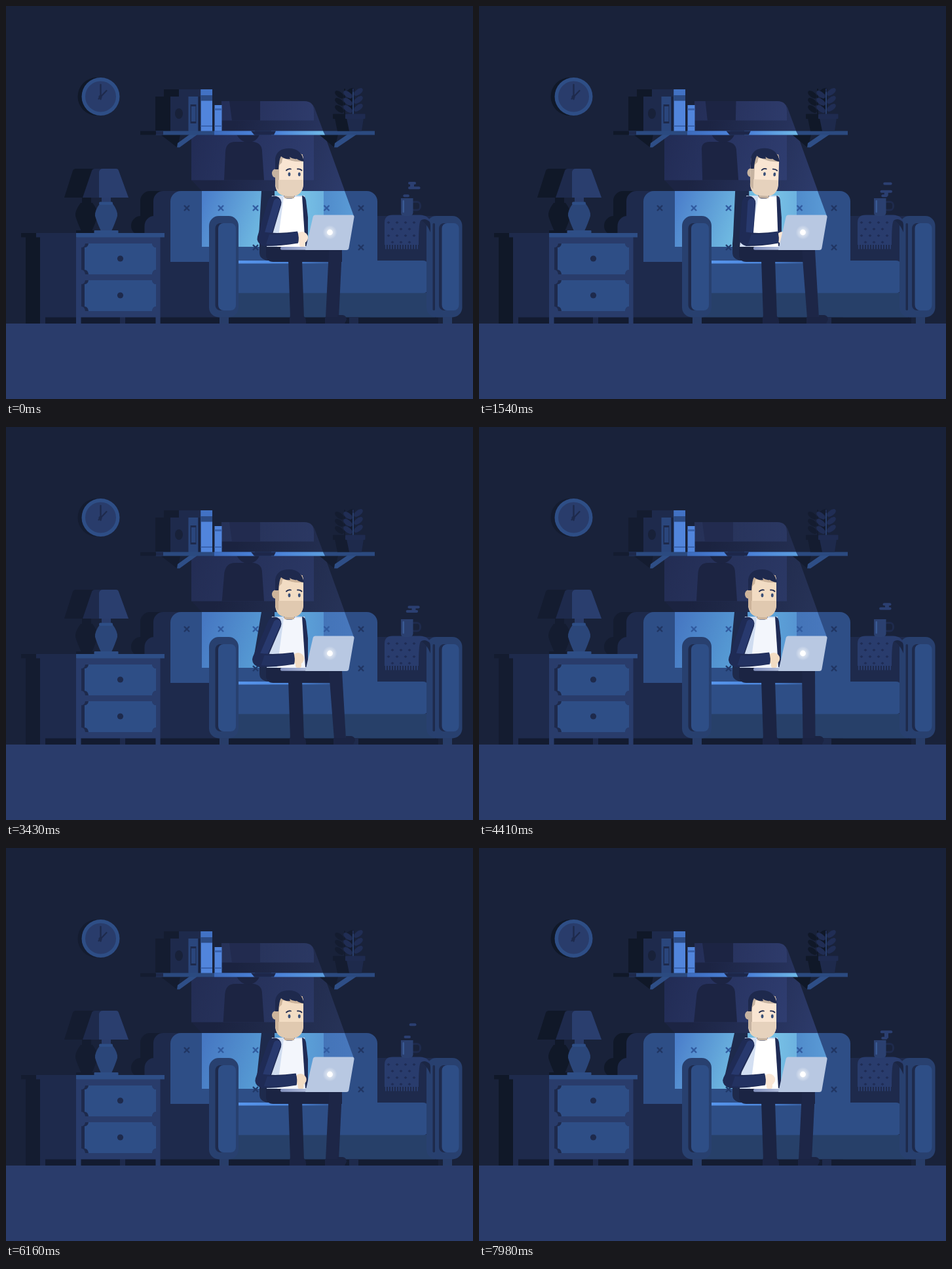
Animation, 713 px wide and 599 px high, one loop 8 s. Source, as an HTML page with a canvas:

```html
<!DOCTYPE html>
<html lang="en">
<head>
<meta charset="utf-8">
<title>Late night on the sofa</title>
<style>
html, body { margin: 0; width: 100%; height: 100%; overflow: hidden; background: #19223a; }
canvas { display: block; }
</style>
</head>
<body>
<canvas id="stage" width="713" height="599"></canvas>
<script>
const c = document.getElementById('stage').getContext('2d');
const LOOP = 8000, STEP = 70;
const WALL = '#19223a', DARK = '#1e2a4c', MID = '#293c6b', LIGHT = '#2e4e86', BLUE = '#5185dc';
const PANTS = '#1b2443', JACKET = '#1f2b55', SLEEVE = '#28396e', HAIR = '#1e294d';
let glow = 1, shade = '#101828';

const clamp = v => Math.max(0, Math.min(1, v));
const smooth = v => { v = clamp(v); return v * v * (3 - 2 * v); };

function keyed(keys, t) {
  if (t <= keys[0][0]) return keys[0][1];
  for (let i = 1; i < keys.length; i++) {
    const [t0, a] = keys[i - 1], [t1, b] = keys[i];
    if (t <= t1) return a + (b - a) * smooth((t - t0) / (t1 - t0));
  }
  return keys[keys.length - 1][1];
}

// Picks between the dim and the bright colour of the screen light.
const lit = (dim, bright) => glow ? bright : dim;

function box(x0, y0, x1, y1, fill, r = 0) {
  c.fillStyle = fill;
  c.beginPath();
  c.roundRect(x0, y0, x1 - x0, y1 - y0, r);
  c.fill();
}

function poly(fill, ...p) {
  c.fillStyle = fill;
  c.beginPath();
  for (let i = 0; i < p.length; i += 2) c.lineTo(p[i], p[i + 1]);
  c.closePath();
  c.fill();
}

function shape(fill, d) {
  c.fillStyle = fill;
  c.fill(new Path2D(d));
}

function oval(x, y, rx, ry, fill, turn = 0) {
  c.fillStyle = fill;
  c.beginPath();
  c.ellipse(x, y, rx, ry, turn, 0, 7);
  c.fill();
}

function line(color, w, ...p) {
  c.strokeStyle = color;
  c.lineWidth = w;
  c.beginPath();
  for (let i = 0; i < p.length; i += 2) c.lineTo(p[i], p[i + 1]);
  c.stroke();
}

function ramp(x0, y0, x1, y1, ...colors) {
  const g = c.createLinearGradient(x0, y0, x1, y1);
  colors.forEach((k, i) => g.addColorStop(i / (colors.length - 1), k));
  return g;
}

function clock() {
  oval(138.5, 138, 29, 29, shade);
  oval(144.5, 138, 29, 29, LIGHT);
  oval(144.5, 138, 23.5, 23.5, MID);
  c.lineCap = 'round';
  line(DARK, 2.4, 144.5, 120, 144.5, 142);
  line(DARK, 2.2, 153.5, 129, 141.5, 141.5);
  oval(144, 138.5, 2.6, 2.6, DARK);
}

function wallLight(lean, arm) {
  const dark = lit('#1c2442', '#1c2443');
  shape(ramp(330, 240, 510, 300, lit('#1b2340', '#1c2443'), lit('#273358', '#2d3b6b')),
    'M329 145H455Q466 145 471 155L484 190L531 320H299V282L283 265V197H329Z');
  shape(ramp(329, 145, 470, 175, lit('#263157', '#242e57'), lit('#2b3863', '#2e3b6b')),
    'M329 145H455Q470 145 470 160V174.5H329Z');
  box(283, 196, 470, 265.5, ramp(283, 200, 470, 265, lit('#232d54', '#222c55'), lit('#2b3865', '#2f3d70')));
  // Cast shadow of the sitter
  const hx = 11 * lean, bx = 6 * lean, ex = bx + .55 * arm;
  poly(lit('#222b4f', dark), 341 + hx * 1.2, 145, 388 + hx * 1.15, 145, 388 + hx, 174.5, 345 + hx, 174.5);
  shape(dark, `M${333 + ex} 265.5L${335 + (bx + ex) / 2} 222Q${336 + bx} 207 ${350 + bx} 207H${378 + bx}
    Q${391 + bx} 209 ${391 + bx} 222L${394 + bx} 265.5Z`);
  shape(dark, `M${352 + hx * .8} 196H${387 + hx * .8}Q${382 + hx * .7} 208 ${369 + hx * .7} 208
    Q${358 + hx * .7} 207 ${352 + hx * .8} 196Z`);
}

function books() {
  box(228, 138, 251, 191, shade);
  box(241, 127, 264, 139, shade);
  box(264, 127, 297, 191, DARK);
  box(251, 138, 279, 191, DARK);
  oval(264, 164, 6, 8, '#182139');
  box(278.5, 138, 293.5, 191, '#2a467c');
  box(281.5, 150, 290.5, 179, DARK);
  box(283, 153, 289.5, 176, '#2a467c');
  box(293.5, 138, 297.5, 191, '#19233f');
  box(297.5, 127, 315, 191, BLUE);
  box(297.5, 127, 315, 136, '#4272c4');
  box(297.5, 136, 315, 144.5, '#2c4b84');
  box(297.5, 182, 315, 184, '#3a64b0');
  box(318.5, 151, 329.5, 191, BLUE);
  box(318.5, 156, 329.5, 159, '#3a64b0');
  box(318.5, 182, 329.5, 184, '#3a64b0');
}

function shelf(lean) {
  const hx = 10 * lean;
  poly(shade, 236, 196, 266, 196, 262, 216);
  poly(LIGHT, 262, 209, 280, 196, 292, 196, 265, 215.5, 261, 215.5);
  poly(shade, 478, 196, 507, 196, 502, 216);
  poly(LIGHT, 502, 209, 521, 196, 535, 196, 506, 215.5, 501, 215.5);
  box(205, 190.5, 228, 196.5, shade);
  box(228, 190.5, 563, 196.5, '#2b4a80');
  box(205, 190.5, 240, 196.5, DARK);
  box(205, 190.5, 229, 196.5, shade);
  box(318, 190.5, 380 + hx, 196.5, ramp(318, 0, 380, 0, '#3c6abc', '#4b82d8'));
  poly(ramp(411, 0, 487, 0, '#4a80d8', lit('#5c9ede', '#70bae8')), 405, 190.5, 484, 190.5, 487, 196.5, 405, 196.5);
  poly('#1d274a', 374 + hx, 190.5, 412 + hx * .8, 190.5, 409 + hx * .8, 196.5, 379 + hx, 196.5);
}

function leaves(x, y, color) {
  for (let i = 0; i < 3; i++) {
    oval(x + 8, y + 5 + i * 12, 8, 4.2, color, -.65);
    oval(x - 8, y + 9 + i * 11, 8, 4.2, color, .65);
  }
  c.lineCap = 'butt';
  line(color, 2, x, y, x, 166);
}

function plant() {
  leaves(517, 126, shade);
  leaves(530, 126, '#202d54');
  line('#2b4474', 1.5, 530, 131, 530, 165);
  poly(shade, 502, 171, 524, 171, 524, 190.5, 506, 190.5);
  box(499, 164.5, 522, 172, shade, 1);
  poly(DARK, 520, 171, 546, 171, 543, 190.5, 524, 190.5);
  box(518, 164.5, 548.5, 172, '#1f2b50', 1);
}

function lamp() {
  const vase = x => `M${x - 7} 292H${x + 7}V300H${x + 9}Q${x + 18} 312 ${x + 17} 320Q${x + 14} 330 ${x + 8} 343
    H${x - 8}Q${x - 14} 330 ${x - 17} 320Q${x - 18} 312 ${x - 9} 300H${x - 7}Z`;
  shape(shade, vase(123));
  shape(shade, 'M89 292L102 251Q103 248 107 248H136L119 292Z');
  box(107, 342, 136, 346, shade);
  shape('#2b4679', vase(153));
  box(142, 298.5, 163, 303, LIGHT, 2);
  box(146, 291, 160, 298.5, MID);
  box(134.5, 342, 171.5, 346.5, LIGHT, 1);
  shape(DARK, 'M117 292L131 251Q132 248 136 248H168Q171 248 172 251L187 292Z');
  shape('#2a3e6e', 'M142 292V253Q143 248 148 248H168Q171 248 172 251L187 292Z');
}

function drawer(y) {
  const d = x => `M${x + 6} ${y}H223Q224 ${y + 6} 229 ${y + 6}V${y + 40}Q224 ${y + 40} 223 ${y + 47}H${x + 6}
    Q${x + 5} ${y + 40} ${x} ${y + 40}V${y + 6}Q${x + 5} ${y + 6} ${x + 6} ${y}Z`;
  shape(DARK, d(115));
  shape(LIGHT, d(120));
  oval(174.5, y + 23, 4.6, 4.6, DARK);
}

function dresser() {
  box(30, 352, 53, 484, shade);
  box(52, 474, 235, 484, '#131b30');
  box(52, 352, 108, 474.5, DARK);
  box(52, 474, 60, 484, DARK);
  box(174, 474, 182, 484, DARK);
  box(107, 352, 235.5, 474.5, MID);
  box(107, 474, 114.5, 484, MID);
  box(228.5, 474, 235.5, 484, MID);
  box(23, 346, 47, 352.5, shade);
  box(46, 346, 108, 352.5, DARK);
  box(107, 346, 242, 352.5, LIGHT);
  drawer(362);
  drawer(418);
}

function armrest(x0, x1, p0, p1) {
  box(x0, 320, x1, 474.5, '#28406f', 15);
  box(p0 - 4.5, 331, p1 - 4, 464, DARK, 8);
  box(p0, 331, p1, 464, LIGHT, 8);
}

function cross(x, y, color) {
  c.lineCap = 'butt';
  line(color, 2.4, x - 4, y - 4, x + 4, y + 4);
  line(color, 2.4, x + 4, y - 4, x - 4, y + 4);
}

function sofa() {
  box(205, 282, 260, 360, shade, 15);
  box(191, 320, 240, 350, shade, 15);
  box(236, 474, 660, 484, '#141c31');
  box(225, 282, 300, 400, DARK, 15);
  box(211.5, 320, 340, 474.5, DARK, [15, 0, 0, 0]);
  box(556, 320, 680, 474.5, DARK);
  box(251, 282, 567, 390, LIGHT, [16, 16, 0, 0]);
  shape(ramp(299, 300, 400, 340, lit('#4677c2', '#4b7fcb'), lit('#589fd6', '#72bee3')),
    'M299 282H420V367H299Z');
  box(420, 282, 485.5, 367, ramp(440, 0, 485, 0, lit('#5ea6da', '#7bc6e8'), lit('#5795d2', '#6db2df')));
  poly(ramp(485, 0, 530, 0, lit('#4474b8', '#508bcb'), lit('#4878bd', '#5a9bd6')),
    485, 282, 517, 282, 531, 320, 485, 330);
  for (const x of [276, 542]) cross(x, 308, '#213663');
  for (const x of [328, 381, 489.5]) cross(x, 308, '#315ba0');
  cross(381, 368, '#213a6a');
  cross(542, 368, '#213663');
  box(340, 437, 655, 474.5, '#274069');
  box(340, 388, 645, 437.5, LIGHT, [0, 8, 8, 0]);
  box(340, 388, 520, 392.5, ramp(355, 0, 515, 0, '#5795ec', '#4c86db', '#2e4e86'));
  poly(DARK, 645, 388, 655, 388, 655, 437, 645, 437);
  armrest(310, 355, 324, 351);
  armrest(642, 696.5, 665.5, 691.5);
  box(651.5, 331, 655, 464, DARK, 2);
  box(326, 474, 340, 484, '#283d69');
  box(667, 474, 681, 484, '#283d69');
  box(524, 474, 538, 484, DARK);
}

function blanket() {
  shape('#1b2644', 'M612 319H634Q648 322 648 335V345Q640 326 630 326Z');
  shape('#293c6d', 'M578 364V330Q578 318.500 590 318.500H632Q646 319 648 330Q640 322 633 327Q630 331 630 364Z');
  for (let j = 0; j < 4; j++)
    for (let i = 0; i < 4; i++) {
      const x = 584 + i * 13 + (j % 2) * 6;
      if (x < 628) poly('#1f2c54', x, 328 + j * 10, x + 2.5, 330 + j * 10, x, 332 + j * 10, x - 2.5, 330 + j * 10);
    }
  for (let x = 579; x < 630; x += 4) box(x, 364, x + 2, 370.5, '#293c6d');
}

function cup() {
  c.strokeStyle = DARK;
  c.lineWidth = 3;
  c.beginPath();
  c.roundRect(618, 298.5, 14.5, 12.5, 5);
  c.stroke();
  shape('#2b4070', 'M603 293H621.500V315Q621 320 616 320H608Q603 320 603 315Z');
  box(605.5, 296, 608, 315, '#3a5a94', 1);
}

function steam(t) {
  const puffs = [[270, 620], [277.3, 623], [289.3, 622], [295.8, 620], [314.5, 622], [324, 619]]
    .map(([y0, x], i) => {
      const y = y0 - .0043 * t;
      let w = 18.5 * smooth((y - 261.5) / 14);
      if (y > 283) w -= Math.min(9, (y - 283) * 1.6);
      const hook = i % 2 ? 0 : 10 * smooth((y - 283) / 6);
      return { y, w, x: x - hook + (i === 0 ? -.004 * t : i < 4 ? (280 - y) * .1 : 0) };
    });
  c.save();
  c.beginPath();
  c.rect(595, 240, 50, 53);
  c.clip();
  puffs.forEach(({ x, y, w }, i) => {
    if (w <= 1.2 || y > 297) return;
    const h = Math.min(4, w + .5);
    box(x - w / 2, y - h / 2, x + w / 2, y + h / 2, '#2b3f71', h / 2);
    const next = puffs[i + 1];
    if (i % 2 === 0 && next && w > 9 && next.y < 292) box(x - 3, y, x + 3, next.y, '#2b3f71');
  });
  c.restore();
}

function legs(swing, tap) {
  shape(PANTS, 'M397 364H500Q513 370 513 378V390H408Q397 390 397 378Z');
  poly(PANTS, 431, 386, 452, 386, 455, 476, 434, 476);
  shape(PANTS, 'M434 472H452Q458 474 458 480V484H433V476Z');
  poly('#1d2647', 493, 372, 513, 372, 508 + swing * .85, 476, 488 + swing, 476);
  c.save();
  c.translate(488 + swing, 484);
  c.rotate(-tap);
  shape(PANTS, 'M-1 -10H18V-13H26Q32 -12 32 -6L29 0H-1Z');
  c.restore();
}

function head(lean) {
  const skin = lit('#f2dcc3', '#f9e5d2'), beard = lit('#e0c9b0', '#e6d2bd'), tan = lit('#cdb49b', '#c6b3a1');
  c.save();
  c.translate(432 + 6.5 * lean, 290);
  c.rotate(.1 * lean);
  c.translate(-432, -290 - lean);
  box(425, 280, 440, 293, tan);
  oval(411, 255, 5, 6.5, tan);
  box(411, 224, 454, 289.5, skin, [12, 8, 17, 19]);
  shape(tan, 'M411 240L418 226H453V237Q440 238 430 234Q424 231 422 233L417 265H411Z');
  shape(skin, 'M417 243Q426 232 436 236Q446 239 453.500 237V265H417Z');
  shape(beard, 'M411 265H453.500V273Q452 289.500 437 289.500H428Q413 289 411 273Z');
  shape(tan, 'M411 265H416V280Q411 276 411 270Z');
  shape(HAIR, 'M411 249V232Q414 217 432 217Q451 217 455 237Q448 236 444 233Q438 234 433 230L434 233Q425 234 420 229Q417 233 416 249Z');
  c.lineCap = 'round';
  c.strokeStyle = HAIR;
  c.lineWidth = 1.8;
  c.stroke(new Path2D('M428 250.500Q431 247.500 435 248.500M445 248.500Q449 248 451.500 250.500'));
  oval(432.5, 256.5, 1.9, 2.9, '#3a5078');
  oval(447.8, 256.5, 1.9, 2.9, '#3a5078');
  c.restore();
}

function man(lean, arm, swing, tap) {
  const b = 6.5 * lean, white = lit('#f3f6fc', '#ffffff'), pale = lit('#cfdcf0', '#d3dff2');
  const skin = lit('#f2dcc3', '#fae6d4');
  const sx = 410 + b * .8, ex = 394 + 1.25 * arm, hx = 452 + arm;
  const edge = Math.min(388, ex - 8);
  // Shadow on the cushion behind him
  shape(DARK, `M${390 + b * .5} 282H${410 + b}L412 388H400Q387 386 387 376V362L${edge} 350Z`);
  legs(swing, tap);
  shape(pale, `M${406 + b} 289H${456 + b}L460 367H398Z`);
  shape(white, `M${424 + b} 291H${454 + b * .9}L457 367H414Z`);
  shape(JACKET, `M${452 + b} 289Q${457 + b} 290 ${458 + b * .8} 296L${461 + b * .4} 322V366H457Z`);
  box(424 + b, 288, 441 + b, 293.5, HAIR, [0, 0, 6, 6]);
  head(lean);
  box(419, 367, 460, 371.8, ramp(419, 0, 460, 0, '#8290bd', '#b1bddc'), 2);
  // Arm
  oval(hx, 353, 9.2, 9, skin);
  box(hx - 4, 358, hx + 5, 367, skin, 3);
  c.lineJoin = c.lineCap = 'round';
  line(JACKET, 21, sx, 300, ex, 354.5);
  line(SLEEVE, 11, sx + 4, 299, ex + 5, 351);
  shape(JACKET, `M${ex - 4} 344Q${ex + 20} 348 ${hx - 7} 343.500Q${hx - 4} 353 ${hx - 6} 361.500
    Q${ex + 25} 366 ${ex} 366Q${ex - 10} 362 ${ex - 10} 354Z`);
  shape('#233261', `M${ex + 8} 348Q${ex + 24} 349 ${hx - 7} 344Q${hx - 5} 353 ${hx - 6} 361Q${ex + 20} 365 ${ex + 3} 363Z`);
}

function laptop() {
  shape('#b8c8e2', 'M472.500 318.500H528.500Q532 318.500 531.500 322L523.500 368.500Q523 372 519.500 372H457L468.500 322Q469 318.500 472.500 318.500Z');
  const g = c.createRadialGradient(494.5, 345, 2, 494.5, 345, 11);
  g.addColorStop(0, 'rgba(255,255,255,.65)');
  g.addColorStop(1, 'rgba(255,255,255,0)');
  oval(494.5, 345, 11, 11, g);
  oval(494.5, 345, 4.4, 4.4, '#ffffff');
}

const LEAN = [[910, 0], [1330, .35], [1750, .35], [2240, 1], [2590, 1], [3150, 0]];
const ARM = [[0, 0], [420, -3], [840, 0], [1330, 11], [1820, 11], [2380, 0], [2870, -13], [3290, -6],
  [3430, -6], [3780, -9], [4200, -2], [4410, -2], [4900, -4], [5460, -1], [6160, -2.5], [6720, -2.5],
  [7140, -14], [7420, -9], [7700, -13], [7980, -9]];
const SWING = [[910, 0], [1470, 13], [4130, 13], [4690, 0]];

function draw(t) {
  glow = t < 2940 || t >= 7770;
  shade = lit('#141c30', '#101828');
  const lean = keyed(LEAN, t), arm = keyed(ARM, t), swing = keyed(SWING, t);
  const tap = t > 5110 && t < 7900 ? .04 * Math.max(0, Math.sin((t - 5110) / 110)) : 0;
  box(0, 0, 713, 599, WALL);
  box(0, 484, 713, 599, '#2a3c6b');
  clock();
  wallLight(lean, arm);
  books();
  shelf(lean);
  plant();
  sofa();
  lamp();
  dresser();
  blanket();
  cup();
  steam(t);
  man(lean, arm, swing, tap);
  laptop();
}

const start = performance.now();
function frame() {
  const t = (performance.now() - start) % LOOP;
  draw(Math.floor(t / STEP) * STEP);
  requestAnimationFrame(frame);
}
frame();
</script>
</body>
</html>
```
